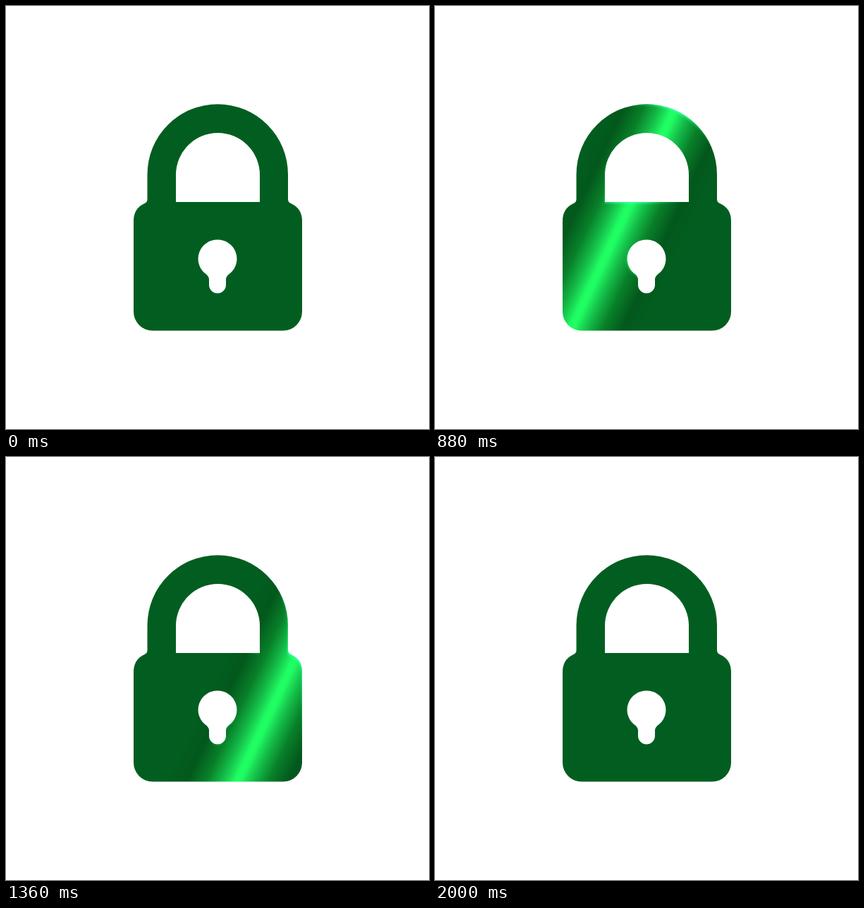
Animation of 600x600 px, one loop 2200 ms. Source, as an HTML page:

```html
<!DOCTYPE html>
<html lang="en">
<head>
<meta charset="utf-8">
<title>Shining padlock</title>
<style>
  html, body { margin: 0; width: 100%; height: 100%; overflow: hidden; background: #fff; }
  svg { display: block; width: 100%; height: 100%; }
</style>
</head>
<body>
<svg viewBox="0 0 600 600">
  <defs>
    <path id="lock" clip-rule="evenodd" fill-rule="evenodd" d="
      M200.5 239 A99.75 99.75 0 0 1 400 239
      V274 Q400 278.5 404 280 Q420 287 420 305
      V433 A27 27 0 0 1 393 460.5 H208 A27 27 0 0 1 181 433
      V305 Q181 287 196.500 280 Q200.500 278.500 200.500 274 Z
      M241 278 H360 V239.500 A59.500 59.500 0 0 0 241 239.500 Z
      M300 331.500 A27 27 0 0 1 318 379 Q312 383 312 388
      V395.500 A12 12 0 0 1 288 395.500 V388 Q288 383 282 379
      A27 27 0 0 1 300 331.500 Z"/>
    <clipPath id="lockClip"><use href="#lock"/></clipPath>
    <filter id="soften" x="-10%" y="-10%" width="120%" height="120%">
      <feGaussianBlur stdDeviation="0.8"/>
    </filter>
    <mask id="rim" maskUnits="userSpaceOnUse" x="0" y="0" width="600" height="600">
      <rect width="600" height="600" fill="#fff"/>
      <use href="#lock" transform="translate(-1 2.2)" fill="#000" filter="url(#soften)"/>
    </mask>
    <linearGradient id="shine" gradientUnits="userSpaceOnUse"/>
    <linearGradient id="glint" gradientUnits="userSpaceOnUse"/>
  </defs>
  <g clip-path="url(#lockClip)">
    <rect id="body" width="600" height="600"/>
    <rect id="edge" width="600" height="600" fill="url(#glint)" mask="url(#rim)"/>
  </g>
</svg>
<script>
const LOOP = 2200, STEP = 40, START = 200, END = 2000;
const BASE = '#025e20';
const REACH = 105;   // horizontal half width of the light band
const SLANT = 0.47;  // horizontal shift of the band per pixel of height

const byId = id => document.getElementById(id);
const shine = byId('shine'), glint = byId('glint');
const body = byId('body'), edge = byId('edge');

// Stops are [distance from the band's centre, colour, opacity], mirrored.
function addStops(gradient, half) {
  const mirrored = half.slice(1).reverse().map(([d, ...rest]) => [-d, ...rest]);
  for (const [distance, color, opacity = 1] of [...mirrored, ...half]) {
    const stop = document.createElementNS('http://www.w3.org/2000/svg', 'stop');
    stop.setAttribute('offset', 0.5 + distance / (2 * REACH));
    stop.setAttribute('stop-color', color);
    stop.setAttribute('stop-opacity', opacity);
    gradient.append(stop);
  }
}

addStops(shine, [
  [0, '#20ff64'], [5, '#1ffa61'], [12, '#1bdf57'], [25, '#13b545'],
  [45, '#088029'], [72, '#03581c'], [REACH, BASE]
]);
addStops(glint, [
  [0, '#38ffb4', 0.85], [25, '#24ff90', 0.65], [50, '#12d45c', 0.3], [75, '#08a040', 0]
]);

// The gradient runs across the slanted band; its centre is given at y = 300.
function placeBand(gradient, center) {
  const length = REACH / (1 + SLANT * SLANT);
  const dx = length, dy = length * SLANT;
  gradient.setAttribute('x1', center - dx);
  gradient.setAttribute('y1', 300 - dy);
  gradient.setAttribute('x2', center + dx);
  gradient.setAttribute('y2', 300 + dy);
}

function draw(time) {
  const t = Math.floor((time % LOOP) / STEP) * STEP;
  const lit = t >= START && t < END;
  body.setAttribute('fill', lit ? 'url(#shine)' : BASE);
  edge.setAttribute('visibility', lit ? 'visible' : 'hidden');
  if (lit) {
    const center = 211 + (t - 680) * 0.283;
    placeBand(shine, center);
    placeBand(glint, center);
  }
}

const began = performance.now();
function tick() {
  draw(performance.now() - began);
  requestAnimationFrame(tick);
}
tick();
</script>
</body>
</html>
```
